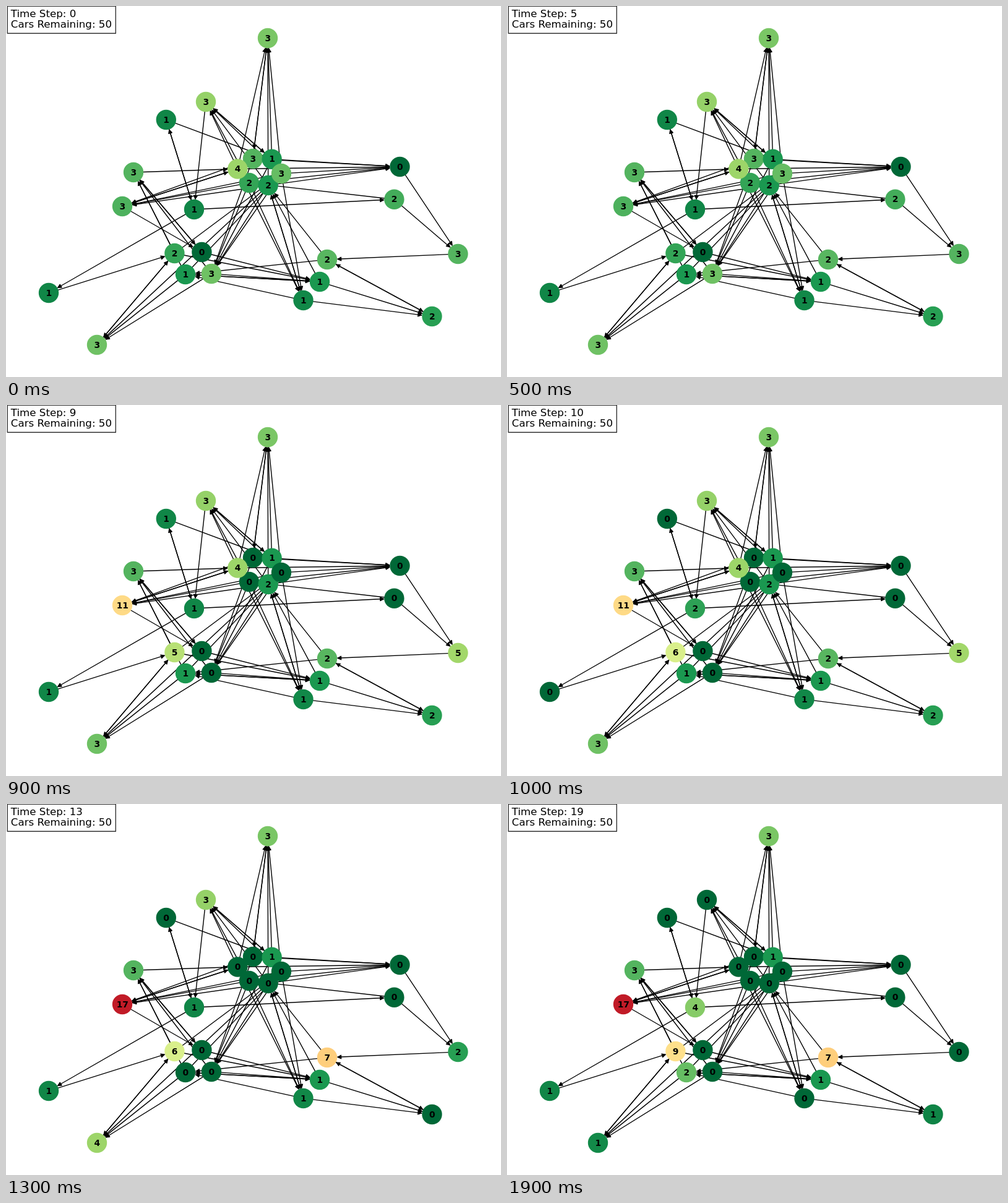
Write an HTML page with a canvas that moves like this. It is 800 px wide and 600 px high and loops after 2000 ms.

```html
<!DOCTYPE html>
<html lang="en">
<head>
<meta charset="utf-8">
<title>Traffic network</title>
<style>
  html, body { margin: 0; width: 100%; height: 100%; overflow: hidden; background: #fff; }
  canvas { display: block; }
</style>
</head>
<body>
<canvas id="stage" width="800" height="600"></canvas>
<script>
const ctx = document.getElementById('stage').getContext('2d');
const STEP_MS = 100, STEPS = 20;
const PT = 100 / 72; // pixels per point
const FONT = '"DejaVu Sans", sans-serif';

// name: [x, y, capacity, cars at the start], in painting order
const nodes = {
  A: [423, 52, 13, 3],
  B: [323, 155, 11, 3],
  C: [258.8, 184, 16, 1],
  D: [399, 247, 17, 3],
  E: [429.7, 247.7, 10, 1],
  K: [393, 286, 15, 2],
  L: [423.7, 290, 20, 2],
  F: [374.3, 263.5, 14, 4],
  G: [445, 271, 15, 3],
  H: [636.5, 260, 10, 0],
  I: [206, 269, 17, 3],
  J: [188, 324, 18, 3],
  M: [304, 329, 16, 1],
  N: [627.4, 312.7, 13, 2],
  O: [730.5, 401, 17, 3],
  P: [272.4, 400, 15, 2],
  Q: [316.4, 398, 10, 0],
  R: [290, 434, 10, 1],
  S: [332, 433, 14, 3],
  T: [519, 410, 11, 2],
  U: [507, 446, 10, 1],
  V: [480.5, 476, 15, 1],
  W: [688.5, 502, 17, 2],
  X: [69, 464, 16, 1],
  Y: [147, 548, 14, 3]
};

// Each pair is a one-way road
const roads = `
  FA AD DA LA EA GA FB KB LB GB EB BE BM CE CM MC
  DH EH FH GH KH LH JF FJ DJ GJ KJ LJ IF JQ
  IQ QI SI PI RI MX MN NK HO NO OT TW WT TR TL
  UL UW VW VR UR RU SU QU PU LV VL FV KV GV
  DS ES GS KS LS XP PY YP LY RY SY PG RG
`.trim().split(/\s+/);

// step: cars moved, as road and count
const moves = {
  6: 'KJ2', 7: 'SY3', 8: 'DJ3 NO2', 9: 'GJ3 YP3', 10: 'CM1 XP1',
  11: 'LJ2 RY1 MX1', 12: 'OT3 WT2', 13: 'FJ4', 14: 'BM3',
  15: 'VR1', 16: 'TR1 TW1', 17: 'YP3', 19: 'OT2'
};

const ramp = ['006837', '1a9850', '66bd63', 'a6d96a', 'd9ef8b', 'ffffbf',
              'fee08b', 'fdae61', 'f46d43', 'd73027', 'a50026']
  .map(hex => hex.match(/../g).map(part => parseInt(part, 16)));

function loadColor(load) {
  const at = Math.min(load, 1) * 10;
  const i = Math.min(Math.floor(at), 9);
  const mix = ramp[i].map((c, k) => Math.round(c + (ramp[i + 1][k] - c) * (at - i)));
  return `rgb(${mix})`;
}

function countsAt(step) {
  const counts = {};
  for (const name in nodes) counts[name] = nodes[name][3];
  for (const when in moves) {
    if (when > step) continue;
    for (const [from, to, cars] of moves[when].split(' ')) {
      counts[from] -= +cars;
      counts[to] += +cars;
    }
  }
  return counts;
}

function drawRoad([from, to]) {
  const [x0, y0] = nodes[from], [x1, y1] = nodes[to];
  const gap = 15.5, tip = Math.hypot(x1 - x0, y1 - y0) - gap - 1.55;
  ctx.save();
  ctx.translate(x0, y0);
  ctx.rotate(Math.atan2(y1 - y0, x1 - x0));
  ctx.beginPath();
  ctx.moveTo(gap, 0);
  ctx.lineTo(tip, 0);
  ctx.stroke();
  ctx.beginPath();
  ctx.moveTo(tip, 0);
  ctx.lineTo(tip - 4 * PT, 2 * PT);
  ctx.lineTo(tip - 4 * PT, -2 * PT);
  ctx.closePath();
  ctx.fill();
  ctx.stroke();
  ctx.restore();
}

function drawNode(name, cars) {
  const [x, y, capacity] = nodes[name];
  ctx.fillStyle = loadColor(cars / capacity);
  ctx.beginPath();
  ctx.arc(x, y, 16.2, 0, 2 * Math.PI);
  ctx.fill();
}

function drawPanel(step, total) {
  ctx.fillStyle = 'rgba(255, 255, 255, 0.8)';
  ctx.strokeStyle = 'rgba(0, 0, 0, 0.8)';
  ctx.fillRect(2.3, 0.2, 175, 44);
  ctx.strokeRect(2.3, 0.2, 175, 44);
  ctx.fillStyle = '#000';
  ctx.font = `${12 * PT}px ${FONT}`;
  ctx.textAlign = 'left';
  ctx.fillText(`Time Step: ${step}`, 7.8, 18.4);
  ctx.fillText(`Cars Remaining: ${total}`, 7.8, 35);
}

function draw(step) {
  const counts = countsAt(step);
  ctx.fillStyle = '#fff';
  ctx.fillRect(0, 0, 800, 600);

  ctx.fillStyle = ctx.strokeStyle = '#000';
  ctx.lineWidth = PT;
  ctx.lineJoin = ctx.lineCap = 'round';
  roads.forEach(drawRoad);

  for (const name in nodes) drawNode(name, counts[name]);

  ctx.fillStyle = '#000';
  ctx.font = `bold ${10 * PT}px ${FONT}`;
  ctx.textAlign = 'center';
  for (const name in nodes) {
    const [x, y] = nodes[name];
    ctx.fillText(counts[name], x + 0.3, y + 4.7);
  }

  drawPanel(step, Object.values(counts).reduce((sum, n) => sum + n, 0));
}

const start = performance.now();
function tick() {
  draw(Math.floor((performance.now() - start) / STEP_MS) % STEPS);
  requestAnimationFrame(tick);
}
tick();
</script>
</body>
</html>
```
